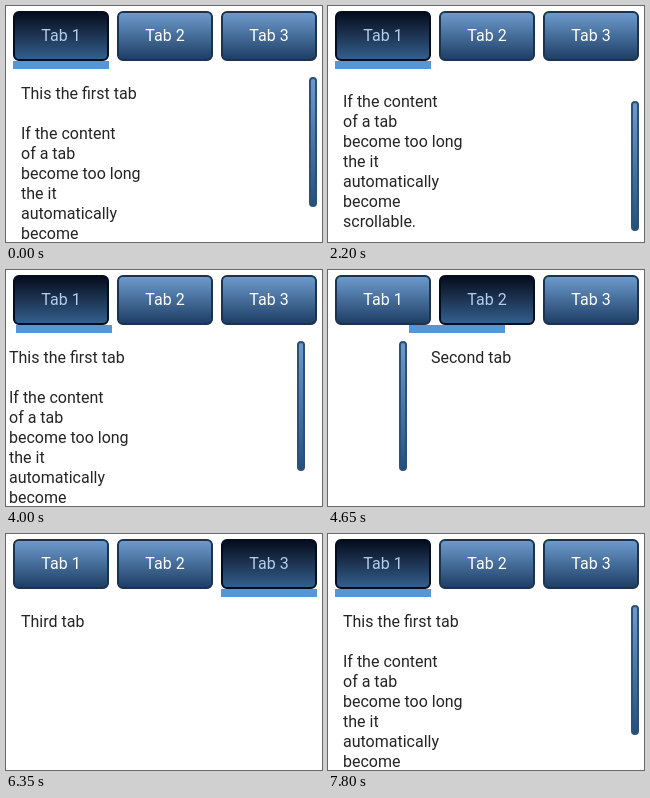
An HTML page for the animation above (8 s loop, 316x236 px).

```html
<!DOCTYPE html>
<html lang="en">
<head>
<meta charset="utf-8">
<title>Swipeable tabs</title>
<style>
  html, body { margin: 0; width: 100%; height: 100%; overflow: hidden; background: #fff; }
  svg { display: block; width: 316px; height: 236px; }
  text { font: 16px Roboto, sans-serif; fill: #242424; white-space: pre; }
  .tab rect { fill: url(#idle); stroke: #1b3350; stroke-width: 2; }
  .tab text { fill: #fff; text-anchor: middle; }
  .tab.on rect { fill: url(#active); stroke: #030d20; }
  .tab.on text { fill: #b4cdec; }
</style>
</head>
<body>
<svg viewBox="0 0 316 236">
  <defs>
    <linearGradient id="idle" x2="0" y2="1">
      <stop stop-color="#6e9ccf"/><stop offset="1" stop-color="#1c3d63"/>
    </linearGradient>
    <linearGradient id="active" x2="0" y2="1">
      <stop stop-color="#060b1a"/><stop offset="1" stop-color="#34608f"/>
    </linearGradient>
    <linearGradient id="bar" x2="0" y2="1">
      <stop stop-color="#6c9acd"/><stop offset="1" stop-color="#24507f"/>
    </linearGradient>
    <clipPath id="view"><rect y="63" width="316" height="173"/></clipPath>
  </defs>
  <g id="tabs"></g>
  <rect id="marker" x="7" y="55" width="96" height="8" fill="#5596d8"/>
  <g clip-path="url(#view)">
    <g id="pages">
      <g id="body"></g>
      <rect id="thumb" x="304" y="72" width="6" height="128" rx="3"
            fill="url(#bar)" stroke="#2c5078" stroke-width="2"/>
      <text x="335" y="93">Second tab</text>
      <text x="655" y="93">Third tab</text>
    </g>
  </g>
</svg>
<script>
  const LOOP = 8000, STEP = 50, PAGE = 320, TAB = 104;
  const $ = id => document.getElementById(id);

  const lines = ['This the first tab', '', 'If the content', 'of a tab', 'become too long',
    'the it', 'automatically', 'become', 'scrollable.'];
  $('body').innerHTML = lines.map((s, i) => `<text x="15" y="${93 + i * 20}">${s}</text>`).join('');
  $('tabs').innerHTML = [0, 1, 2].map(i =>
    `<g class="tab" transform="translate(${7 + i * TAB} 5)">
      <rect x="1" y="1" width="94" height="48" rx="5"/>
      <text x="48" y="30">Tab ${i + 1}</text></g>`).join('');
  const tabs = [...document.querySelectorAll('.tab')];

  const linear = p => p;
  const settle = p => Math.sin(p * Math.PI / 2);

  // [time, value, easing into this key]
  const scrollKeys = [[450, 0], [700, 28], [800, 33], [950, 36], [2150, 36], [2200, 32],
    [2500, 15], [2600, 15], [2800, 0]];
  const swipeKeys = [[3950, 0], [4000, 12], [4300, 165], [4400, 193], [4600, 193],
    [4850, PAGE, settle], [5600, PAGE], [5650, 332], [6000, 485], [6100, 513],
    [6350, 2 * PAGE, settle], [7450, 2 * PAGE], [7800, 0, settle]];

  function valueAt(keys, t) {
    const i = keys.findIndex(k => k[0] > t);
    if (i < 0) return keys[keys.length - 1][1];
    if (i === 0) return keys[0][1];
    const [t0, a] = keys[i - 1], [t1, b, ease = linear] = keys[i];
    return Math.round(a + (b - a) * ease((t - t0) / (t1 - t0)));
  }

  function selectedAt(t) {
    if (t < 4650 || t >= 7500) return 0;
    return t < 6150 ? 1 : 2;
  }

  function render(now) {
    const t = Math.floor((now % LOOP) / STEP) * STEP;
    const scroll = valueAt(scrollKeys, t), swipe = valueAt(swipeKeys, t);
    const lag = swipe % PAGE ? 1 : 0;
    const selected = selectedAt(t), pressed = t >= 7400 ? 0 : -1;

    tabs.forEach((tab, i) => tab.classList.toggle('on', i === selected || i === pressed));
    $('marker').setAttribute('x', 7 + Math.floor(swipe / PAGE * TAB) - lag + (swipe < 20 ? lag : 0));
    $('pages').setAttribute('transform', `translate(${-swipe} 0)`);
    $('body').setAttribute('transform', `translate(0 ${-scroll})`);
    $('thumb').setAttribute('y', 72 + Math.round(scroll * 0.75));
  }

  function tick() {
    render(performance.now());
    requestAnimationFrame(tick);
  }
  tick();
</script>
</body>
</html>
```
